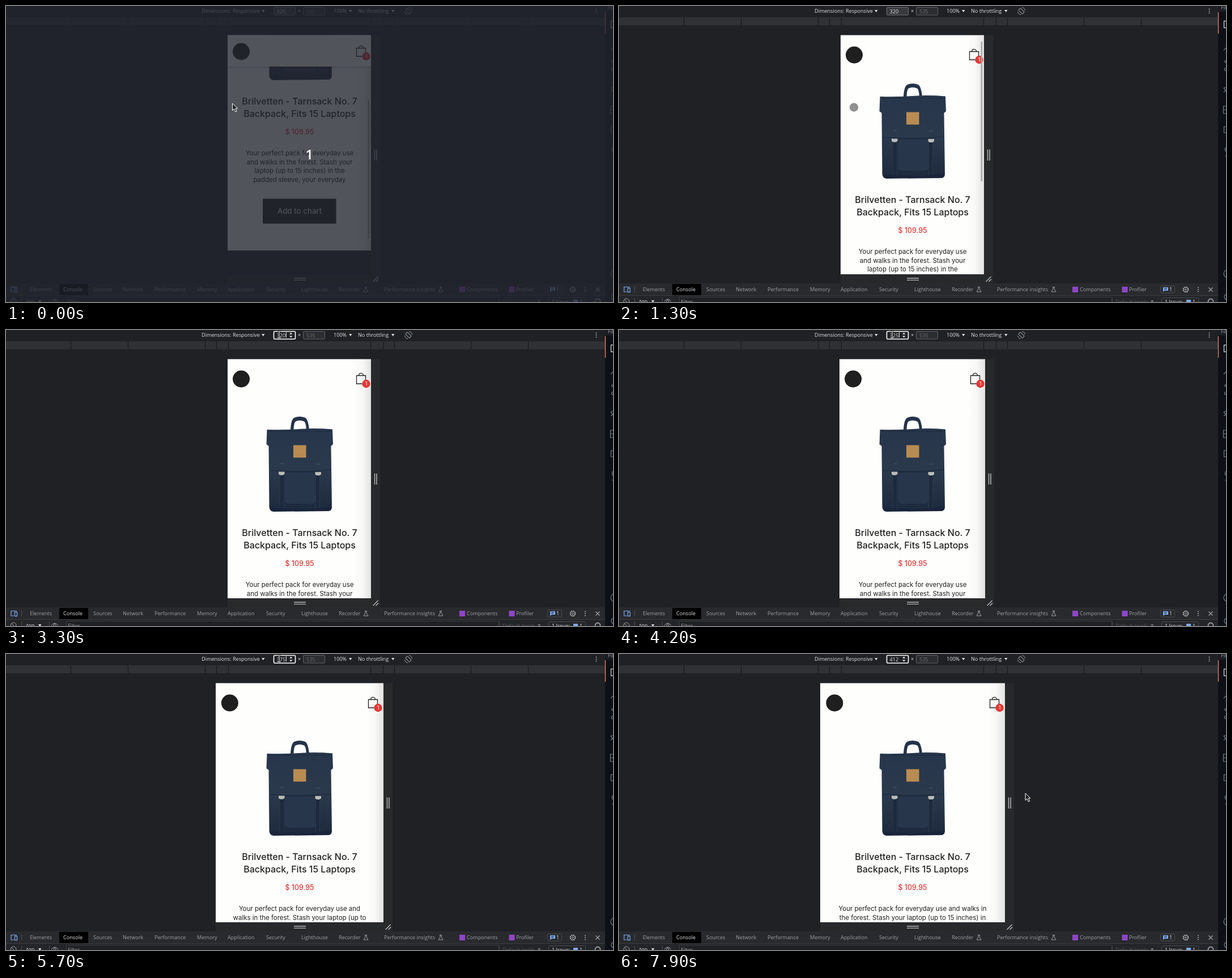
An HTML page that plays this animation: 1071x523 px, repeating every 8 s.

```html
<!DOCTYPE html>
<html lang="en">
<head>
<meta charset="utf-8">
<title>Responsive product page</title>
<style>
  html, body { margin: 0; width: 100%; height: 100%; overflow: hidden; background: #202124; }
  svg { display: block; width: 1071px; height: 523px; }
  text { white-space: pre; }
  .ui { font: 9.1px "Open Sans", "Noto Sans", sans-serif; fill: #dfe1e5; }
  .tab { fill: #9aa0a6; }
  .shop { font-family: Inter, "Open Sans", sans-serif; fill: #212121; text-anchor: middle; }
  .line { fill: none; stroke: #9aa0a6; stroke-width: 1; }
</style>
</head>
<body>
<svg viewBox="0 0 1071 523">
  <defs>
    <clipPath id="screen"><rect id="screenClip" y="51.5" height="422.5"/></clipPath>
    <linearGradient id="edge"><stop offset="0" stop-color="#000" stop-opacity="0"/><stop offset=".5" stop-color="#000" stop-opacity=".025"/><stop offset="1" stop-color="#000" stop-opacity=".11"/></linearGradient>
    <linearGradient id="fabric" x2="0" y2="1"><stop offset="0" stop-color="#27364b"/><stop offset=".5" stop-color="#2b394c"/><stop offset="1" stop-color="#1d293c"/></linearGradient>
    <linearGradient id="drop" x2="0" y2="1"><stop offset="0" stop-opacity=".16"/><stop offset="1" stop-opacity="0"/></linearGradient>
  </defs>

  <rect width="1071" height="523" fill="#202124"/>
  <rect y="20" width="1057" height="14" fill="#303134"/>
  <path id="ticks" stroke="#1b1c1e" stroke-width="1.2"/>
  <g id="toolbar"></g>
  <rect x="524.5" y="2.5" width="38" height="13.5" rx="1.5" fill="#2c2d30" stroke="#5f6368"/>
  <text class="ui" x="530" y="12.5" style="fill:#6b6f74">535</text>
  <g class="line"><rect x="707.5" y="4" width="5" height="10" rx="1" transform="rotate(-45 710 9)"/><path d="M711 2.500a6.500 6.500 0 0 1 5.500 5.500M709 15.500a6.500 6.500 0 0 1-5.500-5.500"/></g>

  <rect id="field" x="472.5" y="2.5" width="38" height="13.5" rx="1.5"/>
  <text id="fieldText" class="ui" x="477.5" y="12.5"></text>
  <path id="spin" d="M500 7.5l2.7-3 2.7 3zM500 10.5l2.7 3 2.7-3z" fill="#e8eaed"/>
  <path id="caret" d="M494.3 4v9.5" stroke="#fff"/>

  <rect id="frame" y="51.5" height="438.5" fill="#28292b"/>
  <g clip-path="url(#screen)">
    <rect id="paper" y="51" height="423" fill="#fefefd"/>
    <g id="page">
      <path d="M502 176Q503 158 508.500 155 518 151 528 155 533 158 535 176H530Q529 163 526 161.500 518 158 511 161.500 508 163 507.500 176Z" fill="#25334a"/>
      <path d="M460.500 176Q490 177 518 175T576 175.500L577 202 573.500 205 575 314Q574 320 568 320L472 321Q465 320 464.500 313L463.500 205 459.500 202Z" fill="url(#fabric)"/>
      <path d="M462 179H575M466 248Q518 252 573 247" fill="none" stroke="#1b273b" stroke-width="1"/>
      <path d="M491 251H547V300Q547 308 539 308H500Q491 308 491 300Z" fill="#27364a" stroke="#18243a"/>
      <path d="M483 254h7.500v64h-7.500zM546.500 254h7v64h-7z" fill="#1d293c" stroke="#314058" stroke-width=".7"/>
      <path d="M466 313Q520 320 573 312V317Q572 320 566 320H472Q466 320 466 313" fill="#16213a" opacity=".6"/>
      <path d="M481 250.500h10.500v4l-3 2h-5l-2.500-2zM545.500 251h10.500v4l-3 2h-5l-2.500-2z" fill="#bcbcb7"/>
      <path d="M484 236h6M547 237h7" stroke="#53627a" stroke-width=".7"/>
      <rect x="507" y="203.500" width="22.500" height="22" fill="#b88c52"/>
      <g class="shop" style="font-size:16px;font-weight:500">
        <text x="518" y="363.500">Brilvetten - Tarnsack No. 7</text>
        <text x="518" y="385.700">Backpack, Fits 15 Laptops</text>
      </g>
      <text class="shop" x="518" y="417" style="font-size:12.400px;font-weight:500;fill:#e53935">$ 109.95</text>
      <g id="blurb" class="shop" style="font-size:11.460px"></g>
      <rect x="453" y="530.500" width="129.500" height="44" fill="#212121"/>
      <text class="shop" x="518" y="557" style="font-size:13.400px;fill:#fff">Add to chart</text>
      <rect x="340" y="622" width="360" height="180" fill="#212224"/>
    </g>
    <rect id="shade" y="51" width="30" height="423" fill="url(#edge)"/>
    <g id="header">
      <rect x="340" y="51" width="360" height="56" fill="#fefefd"/>
      <rect x="340" y="107" width="360" height="4" fill="url(#drop)"/>
    </g>
    <circle id="logo" r="15" fill="#1f1f1f"/>
    <g id="cart">
      <path d="M-8-6H8V8.500H-8ZM-4-6C-4-11.500 4-11.500 4-6" fill="none" stroke="#212121" stroke-width="1.300"/>
      <circle cx="9" cy="8.500" r="7.200" fill="#e53935"/>
      <text class="shop" x="9" y="11.800" style="font-size:9px;fill:#fff">1</text>
    </g>
    <rect id="thumb" width="2.600" height="247" rx="1" fill="#a9a9a9"/>
  </g>
  <g id="grips" stroke="#b4b6b9" stroke-width="1.500" fill="none">
    <path d="M-1.500 253.500V273M2 253.500V273M-4.500 487L4.500 478M.5 487L5 482.500"/>
  </g>
  <path d="M508 481h21M508 484.300h21" stroke="#b4b6b9" stroke-width="1.300"/>

  <rect y="490" width="1057" height="21" fill="#292a2d"/>
  <rect x="94" y="491" width="51" height="20" fill="#000"/>
  <path d="M0 511.500H1057" stroke="#3c3d40"/>
  <rect y="512" width="1057" height="11" fill="#242528"/>
  <rect x="106.500" y="514.500" width="763" height="12" fill="#202124" stroke="#3c3d40"/>
  <path d="M27.500 495v11M27.500 515v8M76.500 515v8M870 515v8" stroke="#4a4c50"/>
  <g fill="none" stroke="#7cacf8" stroke-width="1.200"><path d="M9 504V496.500H19M8 505h6"/><rect x="15.500" y="498.500" width="4" height="7"/></g>
  <g id="tabs"></g>
  <rect x="800" y="496" width="10" height="10" fill="#8f45c8"/>
  <rect x="887.500" y="496" width="10" height="10" fill="#8f45c8"/>
  <g class="line" id="flasks">
    <path d="M633 496.500h4M634 496.500v3.500l-3 5h8l-3-5v-3.500"/>
    <path d="M765 496.500h4M766 496.500v3.500l-3 5h8l-3-5v-3.500"/>
  </g>
  <rect x="955.500" y="494.500" width="25" height="12.500" rx="2" fill="none" stroke="#4a4c50"/>
  <path d="M960 497h9v6h-6l-3 2z" fill="#7cacf8"/>
  <path d="M962 499h5M962 501h4" stroke="#292a2d"/>
  <g class="line">
    <circle cx="1000" cy="501" r="4.500" stroke-width="1.800" stroke-dasharray="2.400 1.130"/><circle cx="1000" cy="501" r="4"/><circle cx="1000" cy="501" r="1.500"/>
    <path d="M1040.500 497.500l7 7M1047.500 497.500l-7 7" stroke-width="1.300"/>
    <circle cx="13" cy="522" r="5"/><path d="M9.500 518.500l7 7"/>
    <path d="M80 522q6-8 12 0"/><circle cx="86" cy="521.500" r="2"/>
    <circle cx="1044" cy="522" r="4.500" stroke-width="1.800"/>
    <rect x="957.500" y="515.500" width="65" height="12" rx="2" stroke="#4a4c50"/>
  </g>
  <g id="dots" fill="#b4b6b9"></g>

  <rect x="1057" width="14" height="523" fill="#0d1117"/>
  <rect x="1057" width="14" height="10" fill="#1a1d23"/>
  <text class="ui tab" x="1062" y="6">File</text>
  <path d="M1057.500 11v38" stroke="#f78166" stroke-width="1.300"/>
  <g fill="none" stroke="#747c87" stroke-width="1.200">
    <rect x="1067.500" y="26.500" width="9" height="12" stroke="#d8dde3"/>
    <path d="M1067 78l6-6M1067 145l5 6M1067 152l6-4M1067 144h6"/>
    <circle cx="1071" cy="98" r="2"/><circle cx="1071" cy="112" r="2.500"/>
    <path d="M1071 177h-4.500v13h4.500M1066.500 183.500h5M1071 213h-3.500v11h3.500"/>
    <path d="M1072 249q-5 4-1 8t-1 9"/>
    <circle cx="1074" cy="473" r="7"/><circle cx="1073" cy="514" r="5"/>
  </g>

  <rect id="veil" width="1071" height="523" fill="rgb(34,37,47)"/>
  <text id="count" x="535" y="270.500" text-anchor="middle" fill="#fff" style="font:600 24px 'Open Sans','Noto Sans',sans-serif">1</text>
  <circle id="touch" r="7.300" fill="#777" fill-opacity=".82" stroke="#888" stroke-width=".6"/>
  <path id="arrow" d="M0 0V12.500L3 9.800 5.300 15 7.600 14 5.300 9H9Z" fill="#222" stroke="#fff"/>
  <g id="beam" fill="none"><path d="M-2.500-5.500h5M0-5.500v11M-2.500 5.500h5" stroke="#222" stroke-width="2.400"/><path d="M-2.500-5.500h5M0-5.500v11M-2.500 5.500h5" stroke="#eee" stroke-width="1"/></g>
</svg>
<script>
const LOOP = 8000, STEP = 100, CENTER = 517.78, ZOOM = 0.79;
const $ = id => document.getElementById(id);
const set = (id, attrs) => { for (const k in attrs) $(id).setAttribute(k, attrs[k]); };
const move = (id, x, y) => set(id, { transform: `translate(${x} ${y})` });
const show = (id, on) => set(id, { opacity: +on });
const label = (x, y, s, extra = '') => `<text class="ui ${extra}" x="${x}" y="${y}">${s}</text>`;
const chevron = (x, y) => `<path d="M${x} ${y}h5.500l-2.750 4z" fill="#dfe1e5"/>`;
const dot = (x, y) => `<circle cx="${x}" cy="${y}" r=".9"/>`;

// Linear interpolation through [time, value] pairs.
function track(keys, t) {
  const i = keys.findIndex(k => k[0] > t);
  if (i < 0) return keys[keys.length - 1][1];
  if (i === 0) return keys[0][1];
  const [t0, a] = keys[i - 1], [t1, b] = keys[i];
  return a + (b - a) * (t - t0) / (t1 - t0);
}

const scrollKeys = [[400, 190], [500, 178], [600, 146], [700, 108], [800, 95], [900, 95], [1000, 86],
  [1100, 60], [1200, 33], [1300, 16], [1400, 9], [1500, 5], [1600, 2], [1800, 0]];
// Pointer positions, one per step.
const toField = [[408, 178], [401, 168], [440, 140], [540, 95], [625, 58], [667, 26], [585, 13], [510, 9], [486, 8]];
const fromField = [[465, 30], [418, 92], [450, 160], [560, 215], [680, 242], [738, 246], [717, 246]];

const words = 'Your perfect pack for everyday use and walks in the forest. Stash your laptop (up to 15 inches) in the padded sleeve, your everyday'.split(' ');
// Minimum device width, then the word index where each line ends.
const wraps = [[394, 9, 19], [377, 8, 17], [362, 7, 16], [344, 7, 15], [335, 7, 14], [0, 6, 13, 20]];

function blurb(width) {
  const ends = wraps.find(w => width >= w[0]).slice(1);
  return [...ends, words.length].map((end, i) =>
    `<text x="518" y="${453.6 + i * 15.9}">${words.slice(i ? ends[i - 1] : 0, end).join(' ')}</text>`).join('');
}

function buildChrome() {
  set('ticks', { d: [114, 215, 351, 371, 392, 643, 665, 685, 820, 921].map(x => `M${x + .5} 20v14`).join('') });
  $('toolbar').innerHTML = label(345, 12.3, 'Dimensions: Responsive') + chevron(451, 7) + label(515, 12.3, '×') +
    label(578, 12.3, '100%') + chevron(605, 7) + label(621, 12.3, 'No throttling') + chevron(680, 7);
  const tabs = [[42, 'Elements'], [101, 'Console'], [154, 'Sources'], [206, 'Network'], [262, 'Performance'],
    [337, 'Memory'], [391, 'Application'], [459, 'Security'], [521, 'Lighthouse'], [587, 'Recorder'],
    [667, 'Performance insights'], [813, 'Components'], [900, 'Profiler']];
  $('tabs').innerHTML = tabs.map(([x, s]) => label(x, 503.8, s, s === 'Console' ? '' : 'tab')).join('') +
    label(971, 504, '1') + label(36, 525, 'top') + chevron(57, 520) + label(109, 525.5, 'Filter', 'tab') +
    `<g opacity=".4">${label(876, 525.5, 'Default levels', 'tab')}${chevron(938, 520)}</g>` +
    label(963, 525.5, '1 Issue:') + label(1012, 525.5, '1') + '<rect x="1001" y="519" width="8" height="6" fill="#7cacf8"/>';
  $('dots').innerHTML = [-3.5, 0, 3.5].map(d => dot(1041.5, 9 + d) + dot(1022, 501 + d)).join('');
}

function pointer(t) {
  if (t < 200) return ['arrow', 399.5, 172];
  if (t < 1900) return ['touch', 414.5, 179];
  if (t >= 2700 && t < 7300) return ['beam', t < 2900 ? 486 : t < 3100 ? 484 : 482, 8.2];
  const [x, y] = t < 2700 ? toField[(t - 1900) / STEP] : fromField[(t - 7300) / STEP];
  const [left, right] = t < 2700 ? [391, 644] : [355, 680];
  return [y > 51 && x > left && x < right ? 'touch' : 'arrow', x, y];
}

let lastWidth = 0;
function render(time) {
  const t = Math.floor(time % LOOP / STEP) * STEP;
  const width = t < 3600 ? 320 : Math.min(412, Math.max(321, Math.round(345 + (t - 4800) * 0.0335)));
  const left = Math.round(CENTER - width * ZOOM / 2), right = Math.round(CENTER + width * ZOOM / 2);
  const scroll = track(scrollKeys, t);
  const stuck = track([[900, 1], [1200, 0]], t);
  const focused = t >= 2700;

  set('screenClip', { x: left, width: right - left });
  set('paper', { x: left, width: right - left });
  set('frame', { x: left, width: right - left + 16 });
  set('shade', { x: right - 30 });
  move('grips', right + 8, 0);
  move('page', 0, -scroll);
  if (width !== lastWidth) $('blurb').innerHTML = blurb(width);
  lastWidth = width;

  const inset = (width - 320) * 0.015, rowY = 86.5 - 6 * stuck;
  show('header', stuck);
  move('logo', left + 24 + inset, rowY);
  move('cart', Math.round(right - 18 - inset) + 0.5, rowY);
  set('thumb', { x: right - 5.5, y: 53.6 + scroll * 0.586, opacity: track([[1800, 1], [2100, 0]], t) });

  set('field', { fill: focused ? '#202124' : '#38393c', stroke: focused ? '#fff' : '#6f7378', 'stroke-width': focused ? 1.6 : 1 });
  $('fieldText').textContent = width;
  show('spin', focused);
  show('caret', t >= 3300 && t < 7300);

  show('veil', t < 100 ? 0.78 : t < 200 ? 0.4 : 0);
  show('count', t < 100);
  const [kind, x, y] = pointer(t);
  for (const id of ['arrow', 'touch', 'beam']) show(id, id === kind);
  move(kind, x, y);
}

buildChrome();
const start = performance.now();
function loop() {
  render(performance.now() - start);
  requestAnimationFrame(loop);
}
loop();
</script>
</body>
</html>
```
